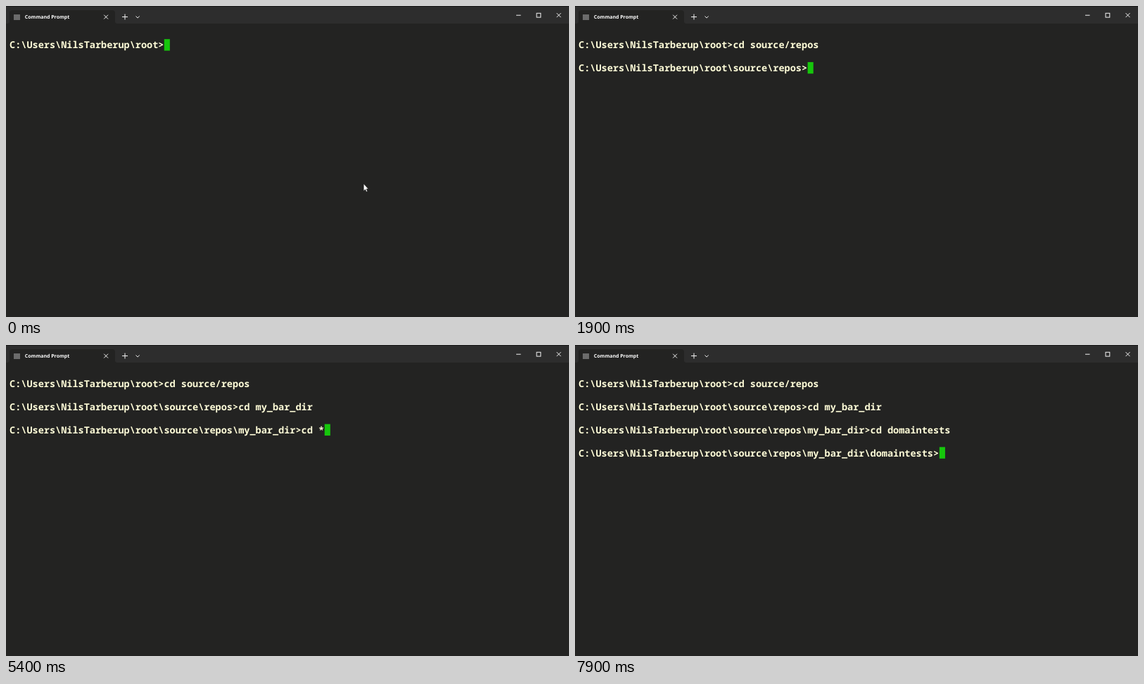
Write an HTML page that moves like this. It is 800 px wide and 443 px high and loops after 8000 ms.

```html
<!DOCTYPE html>
<html lang="en">
<head>
<meta charset="utf-8">
<title>Terminal session</title>
<style>
  html, body { margin: 0; width: 100%; height: 100%; overflow: hidden; background: #232322; }
  svg { display: block; width: 100%; height: 100%; }
  .row { font: 600 13.567px "Noto Sans Mono", "DejaVu Sans Mono", monospace; fill: #fffdd8;
         white-space: pre; font-variant-ligatures: none; text-rendering: geometricPrecision; }
  .title { font: 700 6.97px "Open Sans", "Noto Sans", sans-serif; fill: #fff; text-rendering: geometricPrecision; }
  .icon { fill: none; stroke: #f2f2f2; stroke-width: 1; }
</style>
</head>
<body>
<svg viewBox="0 0 800 443" xmlns="http://www.w3.org/2000/svg">
  <rect width="800" height="443" fill="#232322"/>
  <rect width="800" height="25" fill="#2d2d2d"/>
  <rect width="800" height="1" fill="#1a1a1a"/>
  <path d="M2 25Q5 25 5 22V10Q5 6 9 6H151Q155 6 155 10V22Q155 25 158 25Z" fill="#232322"/>
  <rect x="11" y="12" width="9" height="8" fill="#6b6b6b"/>
  <text class="title" x="26.8" y="18.2">Command Prompt</text>
  <g class="icon">
    <path d="M139.2 12.7l5.8 5.8m0-5.8l-5.8 5.8"/>
    <path d="M165 15.5h8m-4-4v8"/>
    <path d="M184.5 14.5l2.6 2.5 2.6-2.5"/>
    <path d="M725 13.2h6.5"/>
    <rect x="754" y="10.3" width="5.8" height="5.8"/>
    <path d="M782.5 10.1l6 6m0-6l-6 6"/>
  </g>
  <g id="rows"></g>
  <rect id="caret" width="8.1" height="16.4" fill="#16c60c"/>
  <path id="pointer" d="M508.2 253.2V263.4L510.5 261.3L512 264.8L513.6 264.1L512.1 260.7H515Z"
        fill="#fff" stroke="#111" stroke-width=".5"/>
</svg>
<script>
  const LOOP = 8000, LEFT = 5, TOP = 47.2, CELL = 8.14, LINE = 16.36;
  const HOME = "C:\\Users\\NilsTarberup\\root";

  // One [input, time] edit per character of text, appended to what is already there.
  const typed = (before, text, start, gap) =>
    [...text].map((_, i) => [before + text.slice(0, i + 1), start + i * gap]);

  // Each command: when its prompt shows, when Enter is pressed, and its edits.
  const commands = [
    { path: "", start: 0, enter: 1700, edits: [
        ...typed("", "cd source/r", 100, 110),
        ...typed("cd source/r", "epos", 1230, 90)] },
    { path: "\\source\\repos", start: 1800, enter: 4100, edits: [
        ...typed("", "cd ", 2200, 100), ["cd *", 2800],
        ...typed("cd *", "bar*", 3100, 100), ["cd my_bar_dir", 3700]] },
    { path: "\\source\\repos\\my_bar_dir", start: 4200, enter: 7000, edits: [
        ...typed("", "cd ", 4500, 100), ["cd *", 5300],
        ...typed("cd *", "dom", 5600, 100), ["cd *dom*", 6000],
        ["cd domain", 6300], ["cd domaintests", 6700]] },
    { path: "\\source\\repos\\my_bar_dir\\domaintests", start: 7100, enter: Infinity, edits: [] }
  ];

  const byId = id => document.getElementById(id);
  const caret = byId("caret"), pointer = byId("pointer");
  const rows = commands.map((_, i) => {
    const row = document.createElementNS("http://www.w3.org/2000/svg", "text");
    row.setAttribute("class", "row");
    row.setAttribute("x", LEFT);
    row.setAttribute("y", TOP + 13.2 + i * 2 * LINE);
    byId("rows").append(row);
    return row;
  });

  function placeCaret(col, line) {
    caret.setAttribute("x", LEFT + col * CELL);
    caret.setAttribute("y", TOP + line * LINE);
  }

  function draw(t) {
    commands.forEach((cmd, i) => {
      if (t < cmd.start) {
        rows[i].textContent = "";
        return;
      }
      const input = cmd.edits.reduce((last, [text, at]) => t >= at ? text : last, "");
      const text = HOME + cmd.path + ">" + input;
      rows[i].textContent = text;
      if (t >= cmd.enter) placeCaret(0, i * 2 + 1);
      else placeCaret(text.length, i * 2);
    });
    pointer.style.display = t < 100 ? "" : "none";
  }

  const origin = performance.now();
  function tick() {
    draw((performance.now() - origin) % LOOP);
    requestAnimationFrame(tick);
  }
  tick();
</script>
</body>
</html>
```
